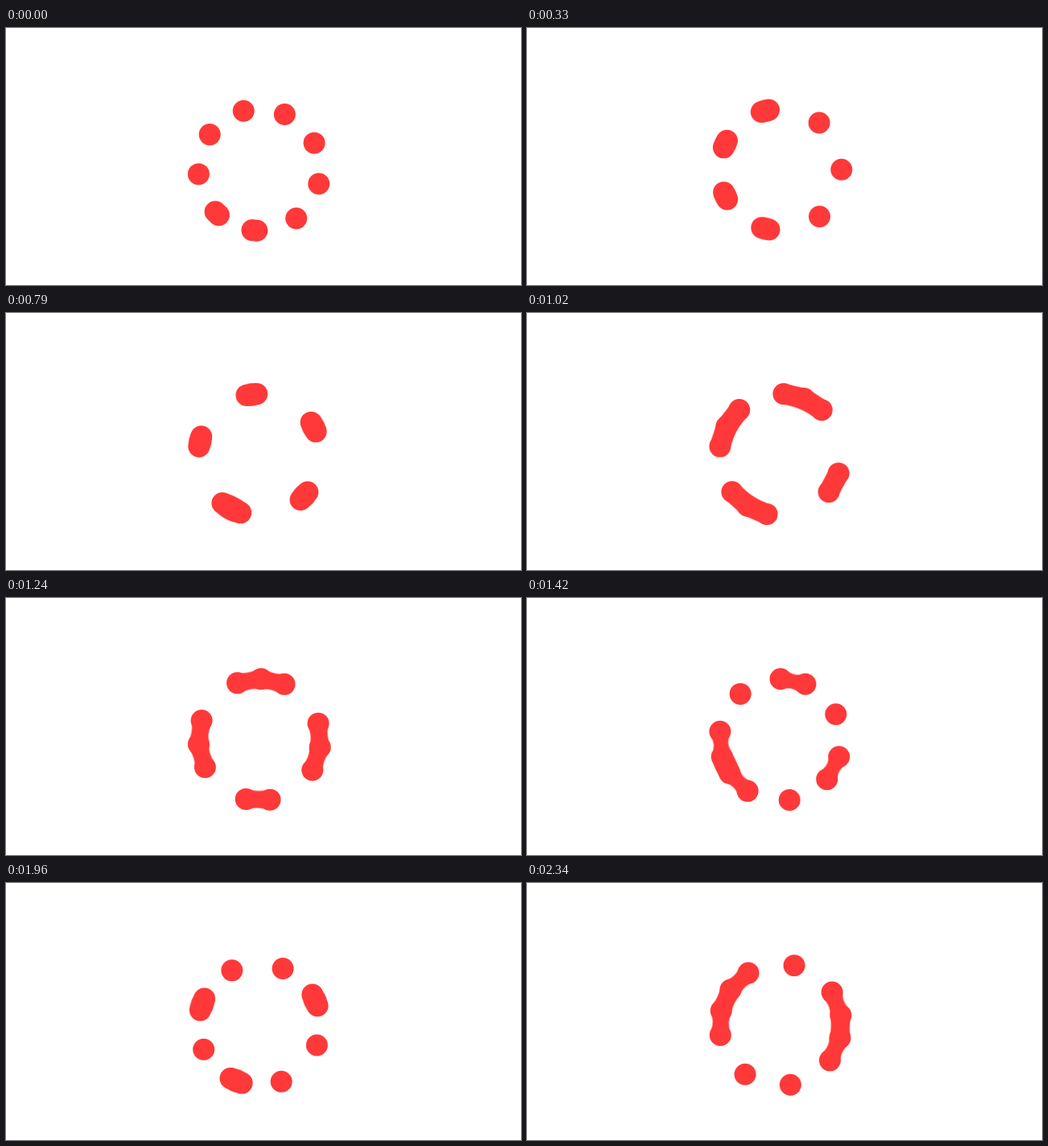
An HTML page that plays this animation: 640 by 320 pixels, repeating every 2440 ms.

```html
<!DOCTYPE html>
<html lang="en">
<head>
<meta charset="utf-8">
<title>Gooey loader</title>
<style>
  html, body { margin: 0; width: 100%; height: 100%; overflow: hidden; background: #fff; }
  svg { display: block; width: 640px; height: 320px; }
</style>
</head>
<body>
<svg viewBox="0 0 640 320">
  <defs>
    <filter id="goo" filterUnits="userSpaceOnUse" x="0" y="0" width="640" height="320" color-interpolation-filters="sRGB">
      <feGaussianBlur in="SourceAlpha" stdDeviation="10"/>
      <feColorMatrix values="1 0 0 0 0  0 1 0 0 0  0 0 1 0 0  0 0 0 18 -7" result="mask"/>
      <feFlood flood-color="#ff3939"/>
      <feComposite in2="mask" operator="in" result="goo"/>
      <feMerge>
        <feMergeNode in="goo"/>
        <feMergeNode in="SourceGraphic"/>
      </feMerge>
    </filter>
  </defs>
  <g id="dots" filter="url(#goo)" fill="#ff3939"></g>
</svg>
<script>
const LOOP = 2440, BEAT = 48, COUNT = 11;
const CX = 315, CY = 176.5, RING = 75.8, DOT = 13.5, START = 57.4;

// Key points: time in ms, angle between neighbouring dots in degrees
const keys = [[0, 39.5], [330, 50.4], [790, 70.05], [1020, 85.05],
              [1420, 106.3], [1960, 136.45], [2340, 157.6]];

const group = document.getElementById('dots');
const dots = Array.from({ length: COUNT }, () => {
  const dot = document.createElementNS(group.namespaceURI, 'circle');
  dot.setAttribute('r', DOT);
  return group.appendChild(dot);
});

// Moves from key to key in even steps of about one beat
function spreadAt(t) {
  const i = keys.findLastIndex(([time]) => time <= t);
  const [t0, a] = keys[i], [t1, b] = keys[i + 1] ?? [LOOP, a];
  const steps = Math.round((t1 - t0) / BEAT);
  const done = Math.floor((t - t0) / (t1 - t0) * steps) / steps;
  return a + (b - a) * done;
}

// The n-th dot turns n times as fast as the first
function draw(t) {
  const spread = spreadAt(t);
  dots.forEach((dot, i) => {
    const angle = (START + (i + 1) * spread) * Math.PI / 180;
    dot.setAttribute('cx', (CX + RING * Math.cos(angle)).toFixed(2));
    dot.setAttribute('cy', (CY + RING * Math.sin(angle)).toFixed(2));
  });
}

function tick() {
  draw(performance.now() % LOOP);
  requestAnimationFrame(tick);
}
tick();
</script>
</body>
</html>
```
